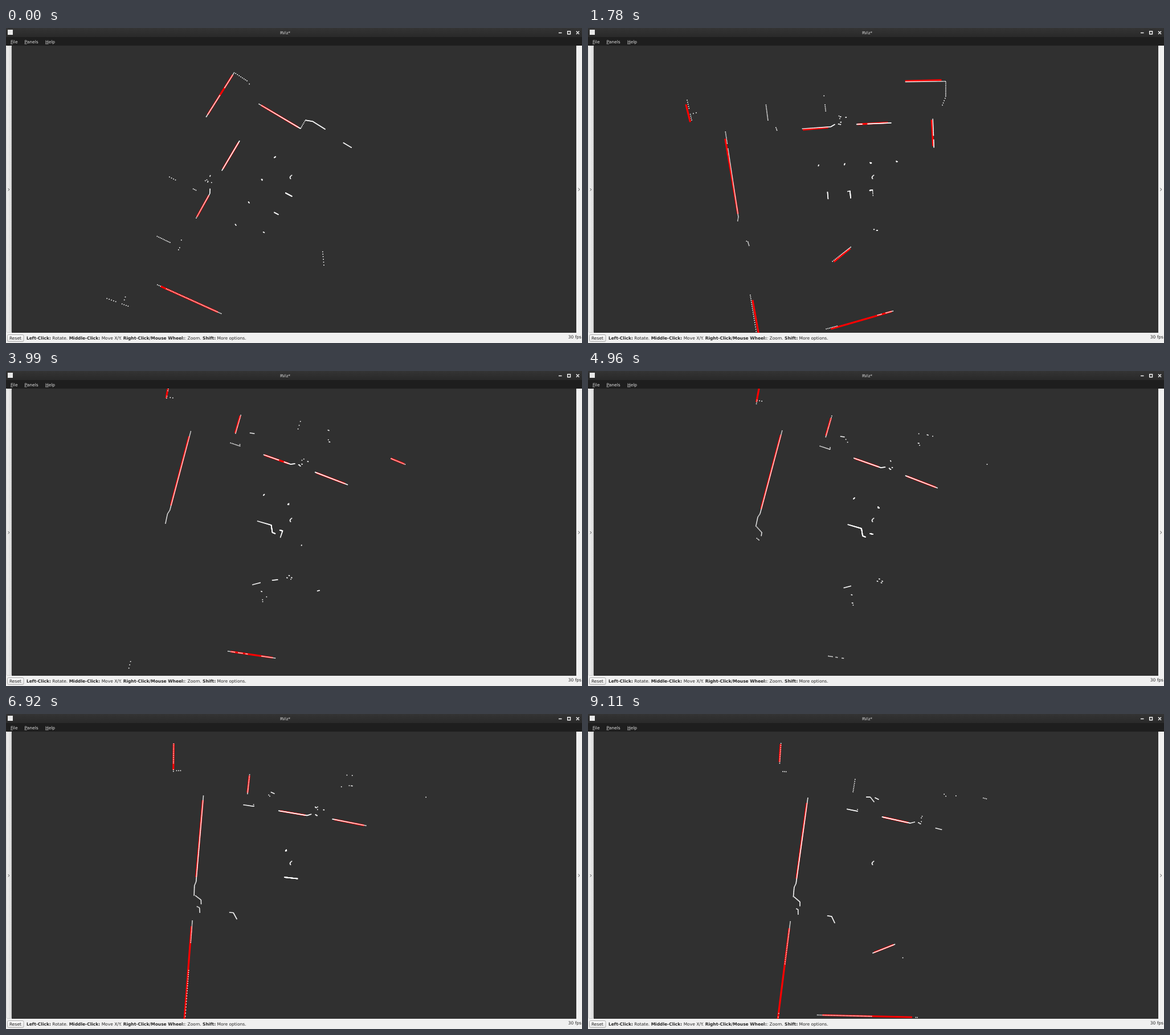
These frames come from a looping animation (1011 px wide and 554 px high, 9130 ms). An HTML page with a canvas:

```html
<!DOCTYPE html>
<html lang="en">
<head>
<meta charset="utf-8">
<title>RViz</title>
<style>
  html, body { margin: 0; width: 100%; height: 100%; overflow: hidden; background: #303030; }
  canvas, svg { position: absolute; left: 0; top: 0; }
  text { font: 7.5px "DejaVu Sans", sans-serif; white-space: pre; }
  .bold { font-weight: bold; }
  .key { text-decoration: underline; }
</style>
</head>
<body>
<canvas id="view" width="1011" height="554"></canvas>
<svg width="1011" height="554" viewBox="0 0 1011 554">
  <defs>
    <linearGradient id="bar" x2="0" y2="1"><stop stop-color="#343434"/><stop offset="1" stop-color="#292929"/></linearGradient>
    <linearGradient id="button" x2="0" y2="1"><stop stop-color="#fcfcfc"/><stop offset="1" stop-color="#e6e6e6"/></linearGradient>
    <linearGradient id="handle"><stop stop-color="#f2f2f2"/><stop offset="1" stop-color="#d9d9d9"/></linearGradient>
  </defs>
  <rect width="1011" height="16" fill="url(#bar)"/>
  <rect y="16" width="1011" height="15" fill="#1e1e1e"/>
  <rect x="3" y="3" width="9" height="9" fill="#e8e8e8"/>
  <g fill="#dedede">
    <text x="490" y="10.5" text-anchor="middle" style="font-size:7px">RViz*</text>
    <text x="8" y="26.5"><tspan class="key">F</tspan>ile</text>
    <text x="32.5" y="26.5"><tspan class="key">P</tspan>anels</text>
    <text x="69" y="26.5"><tspan class="key">H</tspan>elp</text>
  </g>
  <path d="M970 8.5h5.5M985.7 5.7h4.8v5h-4.8zM1001 5.8l5 5m0-5l-5 5" fill="none" stroke="#f4f4f4" stroke-width="1.5"/>
  <path d="M0 31h10v505h-10zM1001 31h10v505h-10zM0 536h1011v18h-1011z" fill="#f0f0f0"/>
  <rect x="1" y="31.5" width="8.5" height="504" rx="2" fill="url(#handle)" stroke="#bbb" stroke-width=".6"/>
  <path d="M3.8 282l2 2.2-2 2.2M1004.5 281.5l2.2 2.5-2.2 2.5" fill="none" stroke="#555"/>
  <rect x="2.5" y="539.5" width="28.5" height="12" rx="2" fill="url(#button)" stroke="#aaa"/>
  <g fill="#262626">
    <text x="6" y="548.3">Reset</text>
    <text x="36" y="548.3"><tspan class="bold">Left-Click:</tspan> Rotate. <tspan class="bold">Middle-Click:</tspan> Move X/Y. <tspan class="bold">Right-Click/Mouse Wheel:</tspan>: Zoom. <tspan class="bold">Shift:</tspan> More options.</text>
    <text x="1010" y="546" text-anchor="end">30 fps</text>
  </g>
</svg>
<script>
const ctx = document.getElementById('view').getContext('2d');
const LOOP = 9130, RAD = Math.PI / 180;
const CENTRE = { x: 500, y: 262 };
const FIRST_RAY = 67, LAST_RAY = 334, RAY_STEP = 0.5;
const FIT_LAG = 30, BOX_ARRIVES = 3200;

// Robot path: position relative to the centre, and turn of the view in degrees.
const path = [
  { at: 0, x: 66.3, y: 43.4, turn: -80.5 },
  { at: 1780, x: 46.6, y: 18.4, turn: -23.5 },
  { at: 2460, x: 37, y: 13.5, turn: -5 },
  { at: 3990, x: 14.5, y: 6, turn: 0 },
  { at: 4960, x: 0, y: 0, turn: 0 },
  { at: 6920, x: -28.4, y: -14.7, turn: -10 },
  { at: 9110, x: -59.7, y: -30.5, turn: -7 }
];

const segments = [];

function addWall(points, from = 0) {
  for (let i = 2; i < points.length; i += 2) {
    const [x, y, p, q] = points.slice(i - 2, i + 2);
    segments.push({ x, y, dx: p - x, dy: q - y, from });
  }
}

// Floor plan: the hall, its side rooms and the boxes in the middle.
const plan = {
  leftWall: '341 104 302 251 298 257 294 276|296 274 305 284 304 291|296 294 300 297 299 306|284 316 228 537',
  leftRoom: '306 2 294 66|299 52 311 54',
  topRoom: '428 79 417 117|443 115 450 116 456 126|458 118 464 122|532 92 515 147',
  topWall: '407 132 425 138 425 133|466 153 514 170 522 169|557 184 614 206',
  rightWall: '645 141 731 177 720 202 708 214|684 228 653 308 669 314 669 327 659 351|641 386 634 404',
  bottomWall: '420 389 462 378|482 374 492 373|560 393 574 390|311 485 487 511'
};
const boxes = '456 270 480 277 482 290 487 292|350 314 357 316 361 328';

const polylines = text => text.split('|').map(line => line.split(' ').map(Number));
Object.values(plan).flatMap(polylines).forEach(line => addWall(line));
polylines(boxes).forEach(line => addWall(line, BOX_ARRIVES));

// A row of round posts and a row of angled legs.
for (let i = 0; i < 4; i++) {
  const x = 467 + 43 * i, y = 224 + 16 * i;
  addWall([x - 1, y - 1, x + 1, y + 1]);
  addWall([x - 1, y + 1, x + 1, y - 1]);
}
for (let i = 0; i < 3; i++) {
  const x = 458 + 37 * i, y = 272 + 14 * i;
  addWall([x, y, x + 5, y + 1, x + 1, y + 13]);
}

let seed = 7;
function random() {
  seed = (seed * 16807) % 2147483647;
  return seed / 2147483647;
}

function addClutter(x, y, radius, count) {
  for (let i = 0; i < count; i++) {
    const a = random() * 2 * Math.PI, r = radius * Math.sqrt(random());
    const px = x + r * Math.cos(a), py = y + r * Math.sin(a);
    addWall([px - 1, py, px + 1, py + 0.6]);
  }
}
addClutter(535, 165, 10, 10);
addClutter(590, 122, 20, 9);
addClutter(512, 371, 6, 4);
addClutter(470, 405, 14, 4);

function pose(time) {
  let i = 0;
  while (i < path.length - 2 && time >= path[i + 1].at) i++;
  const a = path[i], b = path[i + 1];
  const u = Math.min(1, (time - a.at) / (b.at - a.at));
  const mix = key => a[key] + (b[key] - a[key]) * u;
  return { x: CENTRE.x + mix('x'), y: CENTRE.y + mix('y'), turn: mix('turn') };
}

// One sweep of the range finder: the nearest hit along every ray, in view coordinates.
function scan(time) {
  const robot = pose(time), hits = [];
  const present = segments.filter(s => time >= s.from);
  for (let angle = FIRST_RAY; angle <= LAST_RAY; angle += RAY_STEP) {
    const heading = (angle - robot.turn) * RAD;
    const c = Math.cos(heading), s = Math.sin(heading);
    let range = Infinity, wall = null;
    for (const seg of present) {
      const cross = c * seg.dy - s * seg.dx;
      const ox = seg.x - robot.x, oy = seg.y - robot.y;
      const r = (ox * seg.dy - oy * seg.dx) / cross;
      const along = (ox * s - oy * c) / cross;
      if (r > 0 && r < range && along >= 0 && along <= 1) { range = r; wall = seg; }
    }
    if (wall) {
      hits.push({ wall, x: CENTRE.x + range * Math.cos(angle * RAD), y: CENTRE.y + range * Math.sin(angle * RAD) });
    }
  }
  return hits;
}

// Walls seen by enough rays become red fitted lines, a little shorter than the hits.
function drawFits(hits) {
  const runs = new Map();
  for (const hit of hits) {
    if (!runs.has(hit.wall)) runs.set(hit.wall, []);
    runs.get(hit.wall).push(hit);
  }
  ctx.beginPath();
  for (const run of runs.values()) {
    const a = run[0], b = run[run.length - 1];
    const dx = b.x - a.x, dy = b.y - a.y;
    if (run.length < 9 || Math.hypot(dx, dy) < 28) continue;
    ctx.moveTo(a.x + dx * 0.05, a.y + dy * 0.05);
    ctx.lineTo(b.x - dx * 0.05, b.y - dy * 0.05);
  }
  ctx.stroke();
}

function dot(x, y) {
  ctx.fillRect(x - 0.8, y - 0.8, 1.6, 1.6);
}

function draw(time) {
  ctx.fillStyle = '#303030';
  ctx.fillRect(0, 0, 1011, 554);
  ctx.strokeStyle = '#f00';
  ctx.lineWidth = 3.2;
  drawFits(scan(Math.max(0, time - FIT_LAG)));
  ctx.fillStyle = '#fff';
  for (const { x, y } of scan(time)) dot(x, y);
  // The robot's own mount, always in the same place.
  for (let i = 0; i < 7; i++) dot(501.5 - 3 * Math.sin(i * 0.4), 259 + i);
}

const start = performance.now();
function frame() {
  draw((performance.now() - start) % LOOP);
  requestAnimationFrame(frame);
}
frame();
</script>
</body>
</html>
```
